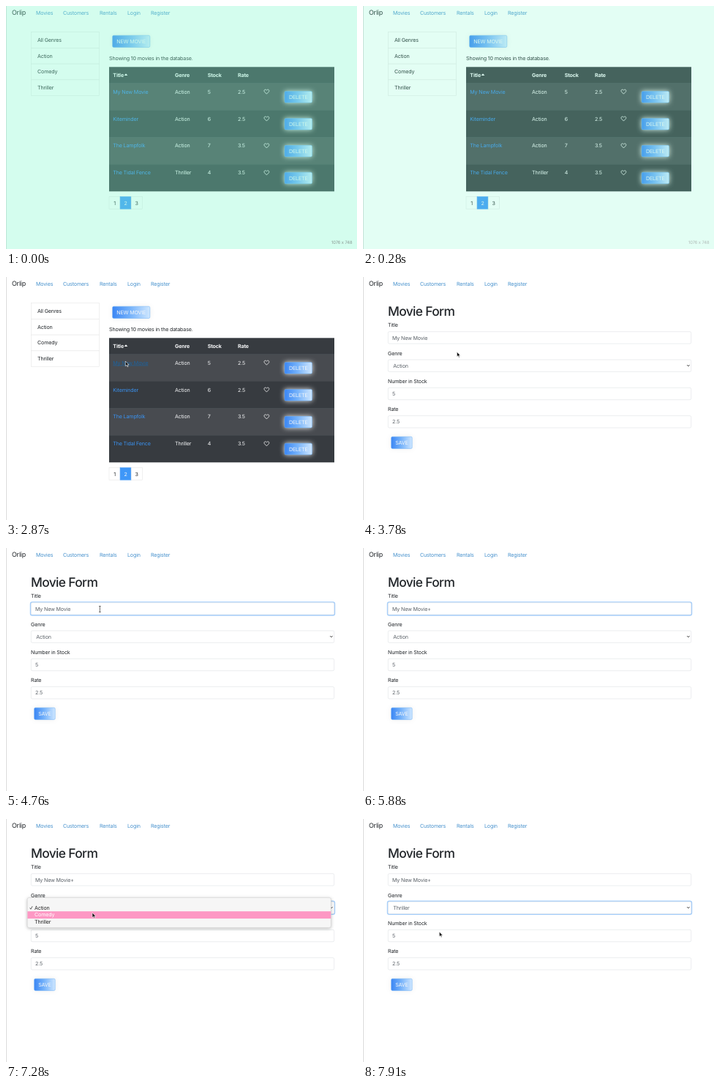
Animation of 480 by 332 pixels, one loop 8000 ms. Source, as an HTML page:

```html
<!DOCTYPE html>
<html lang="en">
<head>
<meta charset="utf-8">
<title>Movie rental admin</title>
<style>
  html, body { margin: 0; width: 100%; height: 100%; overflow: hidden; background: #fff; }
  svg { display: block; width: 100vw; height: 100vh; }
  text {
    font: 7.14px Inter, Roboto, sans-serif;
    letter-spacing: -.023em;
    fill: #212529;
    text-rendering: geometricPrecision;
    white-space: pre;
  }
  .brand { font-size: 8.93px; }
  .nav { fill: #4590cc; }
  .light { fill: #f6f7f8; }
  .bold { font-weight: 700; }
  .link { fill: #3a92f0; }
  .link.hover { fill: #1c639f; text-decoration: underline; }
  .value { fill: #5a6067; }
  .mid { text-anchor: middle; }
  .box { fill: #fff; stroke: #dde1e5; stroke-width: .6; }
  .pale { fill: #fff; stroke: #e6e6e6; stroke-width: .6; }
  .glow { filter: drop-shadow(0 0 3.5px #eee); }
  h1, .heading { font-size: 17.4px; font-weight: 500; letter-spacing: -.038em; }
  .size { font-size: 5.9px; fill: #8a9a94; text-anchor: end; }
</style>
</head>
<body>
<svg id="stage" viewBox="0 0 480 332" preserveAspectRatio="none"></svg>
<script>
const LOOP = 8000, STEP = 70;

const text = (x, y, str, cls = '', id = '') =>
  `<text x="${x}" y="${y}" class="${cls}" id="${id}">${str}</text>`;
const rect = (x, y, w, h, attrs = '') =>
  `<rect x="${x}" y="${y}" width="${w}" height="${h}" ${attrs}/>`;

const button = (x, y, w, h, label, cls = '') =>
  `<g class="${cls}">${rect(x, y, w, h, 'rx="1.6" fill="url(#blue)" stroke="#6aaef5" stroke-width=".5"')}</g>` +
  text(x + w / 2, y + h / 2 + 2.6, label, 'light mid');

const heart = (x, y) =>
  `<path transform="translate(${x} ${y})" fill="none" stroke="#f4f4f4" stroke-width=".8"
    d="M0 3.2L-2.9 .2C-4.4 -1.6 -2.2 -4.3 0 -1.9C2.2 -4.3 4.4 -1.6 2.9 .2Z"/>`;

const navBar = () =>
  text(8, 12.4, 'Orlip', 'brand') +
  [[41, 'Movies'], [78, 'Customers'], [128, 'Rentals'], [166, 'Login'], [198, 'Register']]
    .map(([x, label]) => text(x, 12, label, 'nav')).join('');

const genreList = () =>
  ['All Genres', 'Action', 'Comedy', 'Thriller'].map((label, i) =>
    rect(34.3, 35.6 + i * 21.75, 93, 21.75, 'class="pale"') +
    text(43, 48.8 + i * 21.75, label)).join('');

const movies = [
  ['My New Movie', 'Action', 5, 2.5],
  ['Kiteminder', 'Action', 6, 2.5],
  ['The Lampfolk', 'Action', 7, 3.5],
  ['The Tidal Fence', 'Thriller', 4, 3.5],
];
const columns = [146.3, 231, 275.7, 317];

const movieRow = (movie, i) => {
  const top = 105.3 + i * 36.9;
  return rect(141, top, 308, 36.9, `fill="${i % 2 ? '#373b40' : '#484b50'}"`) +
    rect(141, top, 308, .5, 'fill="#4b5157"') +
    movie.map((cell, c) =>
      text(columns[c], top + 14.3, cell, c ? 'light' : 'link', i || c ? '' : 'hotLink')).join('') +
    heart(356.4, top + 11.7) +
    button(381, top + 11.2, 37.5, 15.6, 'DELETE', 'glow');
};

const pager = () => [1, 2, 3].map((n, i) =>
  rect(141 + i * 15.1, 260.6, 15.1, 16.6, `class="pale"${n === 2 ? ' style="fill:#3f97f8;stroke:#3f97f8"' : ''}`) +
  text(148.5 + i * 15.1, 271.6, n, n === 2 ? 'mid light' : 'mid')).join('');

const listPage = () =>
  genreList() +
  button(145.6, 40.2, 51.2, 16.2, 'NEW MOVIE', 'glow') +
  text(141, 73.6, 'Showing 10 movies in the database.') +
  rect(141, 83.3, 308, 170, 'fill="#373b40"') +
  ['Title', 'Genre', 'Stock', 'Rate'].map((h, c) => text(columns[c], 97.1, h, 'light bold')).join('') +
  '<path d="M161.6 94.9h4.8l-2.4-2.6z" fill="#f6f7f8"/>' +
  movies.map(movieRow).join('') + pager();

const field = (y, label, value, id) =>
  text(34, y, label) +
  `<rect id="${id}Ring" x="33.6" y="${y + 5.8}" width="415.8" height="17.8" rx="2.4" fill="none" stroke="#a3cdfb" stroke-width="1.7"/>` +
  rect(34.3, y + 6.5, 414.4, 16.4, 'rx="1.7" class="box"') +
  text(id === 'genre' ? 41.3 : 40, y + 17.3, value, 'value', id);

const formPage = () =>
  text(34, 52.6, 'Movie Form', 'heading') +
  field(68.2, 'Title', '', 'title') +
  field(106.5, 'Genre', '', 'genre') +
  field(144.8, 'Number in Stock', '5', 'stock') +
  field(183.1, 'Rate', '2.5', 'rate') +
  '<path d="M443.3 120.2l1.6 1.7 1.6-1.7" fill="none" stroke="#333" stroke-width="1"/>' +
  '<path id="caret" d="M0 79.2v7.8" stroke="#333" stroke-width=".7"/>' +
  button(38.6, 218.2, 28.6, 16.2, 'SAVE', 'glow');

const menu = () =>
  rect(29.2, 107.4, 415.2, 41, 'rx="2.4" fill="#f6f6f6" stroke="#ccc" stroke-width=".5" style="filter:drop-shadow(0 1.5px 2px #0004)"') +
  rect(29.4, 0, 414.8, 9.9, 'id="highlight" fill="#fd98c4"') +
  '<path d="M32.6 121.4l1.3 1.8 2.2-4" fill="none" stroke="#333" stroke-width=".8"/>' +
  ['Action', 'Comedy', 'Thriller'].map((g, i) => text(39, 123.5 + i * 9.85, g, '', 'option' + i)).join('');

const $ = id => document.getElementById(id);

$('stage').innerHTML = `
  <defs><linearGradient id="blue">
    <stop offset="0" stop-color="#3b86f4"/><stop offset=".45" stop-color="#72b0fa"/><stop offset="1" stop-color="#cfe7ff"/>
  </linearGradient></defs>
  ${rect(0, 0, 480, 332, 'fill="#fff"')}
  ${navBar()}
  <g id="list">${listPage()}</g>
  <g id="form">${formPage()}</g>
  <g id="menu">${menu()}</g>
  ${rect(0, 0, .8, 332, 'fill="#d4d4d4"')}
  <g id="cursor">
    <path id="arrow" d="M0 0V6.7L1.6 5.3L2.7 7.8L3.8 7.3L2.7 4.9H4.8Z" fill="#111" stroke="#fff" stroke-width=".6"/>
    <path id="beam" d="M-1.3 0H1.3M0 0V8M-1.3 8H1.3" fill="none" stroke="#333" stroke-width=".7"/>
  </g>
  <g id="tint">${rect(0, 0, 480, 332, 'fill="rgb(121,249,202)" fill-opacity=".32"')}
    ${text(473.5, 325, '1076 x 748', 'size')}</g>`;

// Pointer stops: time, x, y
const path = [
  [1050, 244, 260], [1260, 225, 246], [1400, 225, 246], [1680, 163.3, 181.2],
  [2170, 163.3, 122], [2520, 163.3, 115], [3290, 163.3, 115], [3430, 129, 105],
  [3710, 129, 105], [3780, 128.4, 102.3], [4060, 128.4, 84], [4130, 128.4, 84],
  [4200, 128.4, 79.5], [5950, 128.4, 79.5], [6230, 118, 119], [6580, 114, 129],
  [6720, 112, 136.3], [6790, 112, 138], [6930, 112, 138], [7070, 113, 140],
  [7140, 113, 140], [7280, 118, 128], [7350, 118, 128], [7420, 102, 141],
  [7490, 102, 141], [7910, 104.3, 154],
];
// Highlighted menu option from each time on; -1 is none
const highlights = [[6300, 0], [6510, 1], [7000, 2], [7210, 1], [7560, 2], [7630, -1], [7700, 2]];

const clamp = v => Math.max(0, Math.min(1, v));
const between = (t, from, to) => t >= from && t < to;
const show = (id, on) => $(id).setAttribute('visibility', on ? 'visible' : 'hidden');
const fade = (id, v) => $(id).setAttribute('opacity', clamp(v));

function pointerAt(t) {
  const next = path.findIndex(p => p[0] > t);
  if (next < 0) return path[path.length - 1].slice(1);
  if (next === 0) return path[0].slice(1);
  const [a, b] = [path[next - 1], path[next]];
  const k = (t - a[0]) / (b[0] - a[0]);
  return [a[1] + (b[1] - a[1]) * k, a[2] + (b[2] - a[2]) * k];
}

function draw(time) {
  const t = Math.floor(time / STEP) * STEP;
  const onForm = t >= 2940;
  $('list').style.display = onForm ? 'none' : '';
  $('form').style.display = onForm ? '' : 'none';
  fade('tint', 1 - t / 840);
  $('hotLink').classList.toggle('hover', t >= 2240);

  const [x, y] = pointerAt(t);
  const overInput = onForm && y < 91 && t > 3780;
  $('cursor').setAttribute('transform', `translate(${x} ${y})`);
  $('cursor').style.display = t < 1050 || between(t, 5320, 6020) ? 'none' : '';
  show('arrow', !overInput);
  show('beam', overInput);

  $('title').textContent = t >= 5320 ? 'My New Movie+' : 'My New Movie';
  $('genre').textContent = t >= 7700 ? 'Thriller' : 'Action';
  fade('titleRing', t < 6300 ? (t - 4130) / 210 : 1 - (t - 6230) / 210);
  fade('genreRing', (t - 6230) / 210);
  fade('stockRing', 0);
  fade('rateRing', 0);

  const caretOn = between(t, 4200, 4760) || between(t, 5320, 5880);
  $('caret').style.display = caretOn ? '' : 'none';
  if (caretOn) $('caret').setAttribute('transform', `translate(${40 + $('title').getComputedTextLength()} 0)`);

  $('menu').style.display = t >= 6300 ? '' : 'none';
  fade('menu', 1 - (t - 7630) / 210);
  const active = highlights.reduce((found, [from, i]) => t >= from ? i : found, -1);
  show('highlight', active >= 0);
  $('highlight').setAttribute('y', 116.3 + active * 9.85);
  for (let i = 0; i < 3; i++) $('option' + i).style.fill = i === active ? '#fff' : '#222';
}

const start = performance.now();
(function frame() {
  draw((performance.now() - start) % LOOP);
  requestAnimationFrame(frame);
})();
</script>
</body>
</html>
```
